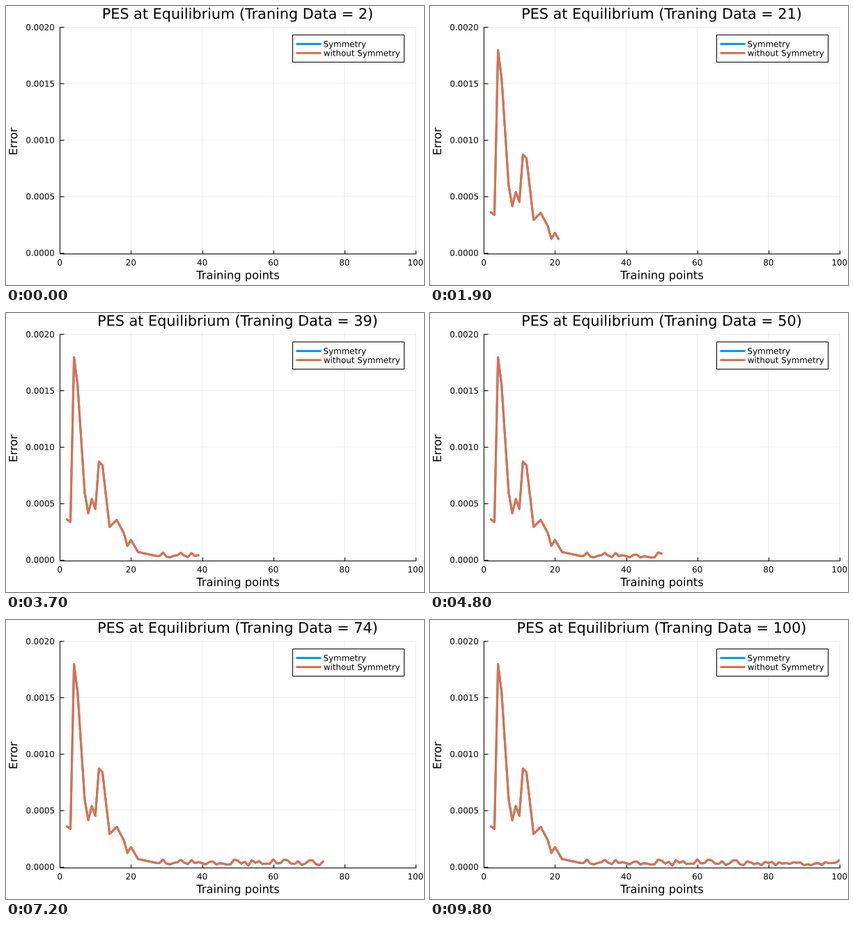
Write a matplotlib script that moves like this. It is 600 px wide and 400 px high and loops after 9.9 s.

```python
import numpy as np
import matplotlib.pyplot as plt
from matplotlib.animation import FuncAnimation
from matplotlib.patches import PathPatch, Rectangle
from matplotlib.textpath import TextPath
from matplotlib.transforms import Affine2D

W, H, DPI = 600, 400, 100
LEFT, RIGHT, TOP, BOTTOM = 77.2, 588, 30.3, 355.3
Y_MIN, Y_MAX = -1e-5, 0.002
BLUE, ORANGE = "#009afa", "#e36f47"
SMALL, MEDIUM, LARGE = 11.86, 16.3, 20.76
FIRST, LAST = 2, 100

plt.rcParams["font.family"] = "DejaVu Sans"


def error_curve(sizes):
    """Turning points of the early decay, then a small random floor."""
    turns = np.array([
        (2, 35.8), (3, 33.4), (4, 179.5), (5, 155), (7, 59.5), (8, 41.2),
        (9, 53.8), (10, 45), (11, 87), (12, 83.7), (14, 29), (16, 35.3),
        (18, 23.5), (19, 12.2), (20, 17.5), (22, 6.8), (27, 3.4),
    ])
    noise = np.random.default_rng(4).triangular(0.2, 2.5, 7.5, len(sizes))
    decay = np.interp(sizes, turns[:, 0], turns[:, 1])
    return 1e-5 * np.where(sizes > turns[-1, 0], noise, decay)


def pt(px):
    return px * 72 / DPI


def outline(text, size, anchor):
    """Glyph path whose ink is anchored at x = 0 (0 left, 0.5 centre, 1 right)."""
    path = TextPath((0, 0), text, size=size)
    box = path.get_extents()
    return Affine2D().translate(-box.x0 - anchor * box.width, 0).transform_path(path)


def label(x, y, text, size, anchor=0.5, angle=0):
    place = Affine2D().rotate_deg(angle).scale(1, -1).translate(x, y)
    patch = PathPatch(outline(text, size, anchor), fc="black", lw=0, snap=False,
                      transform=place + stage.transData, zorder=5)
    return stage.add_patch(patch)


def stroke(axes, xs, ys, color):
    return axes.plot(xs, ys, color=color, lw=pt(3), zorder=4,
                     solid_capstyle="round", solid_joinstyle="round")[0]


fig = plt.figure(figsize=(W / DPI, H / DPI), dpi=DPI, facecolor="white")

ax = fig.add_axes([LEFT / W, 1 - BOTTOM / H, (RIGHT - LEFT) / W, (BOTTOM - TOP) / H])
ax.set_xlim(0, 100)
ax.set_ylim(Y_MIN, Y_MAX)
x_ticks, y_ticks = np.linspace(0, 100, 6), np.linspace(0, Y_MAX, 5)
ax.set_xticks(x_ticks)
ax.set_yticks(y_ticks)
ax.tick_params(direction="in", length=pt(5.5), width=pt(1),
               labelbottom=False, labelleft=False)
ax.set_axisbelow(True)
ax.grid(color="black", alpha=0.1, lw=pt(0.74), snap=False, clip_on=False)
for side, spine in ax.spines.items():
    spine.set_visible(side in ("left", "bottom"))
    spine.set_linewidth(pt(1))

# Overlay in pixel coordinates for text and legend
stage = fig.add_axes([0, 0, 1, 1], zorder=5)
stage.set_xlim(0, W)
stage.set_ylim(H, 0)
stage.axis("off")

for v in x_ticks:
    label(LEFT + (RIGHT - LEFT) * v / 100, 371.9, f"{v:.0f}", SMALL)
for v in y_ticks:
    y = TOP + (BOTTOM - TOP) * (Y_MAX - v) / (Y_MAX - Y_MIN)
    label(69, y + 4.5, f"{v:.4f}", SMALL, anchor=1)

mid_x, mid_y = (LEFT + RIGHT) / 2, (TOP + BOTTOM) / 2
label(mid_x, 391.5, "Training points", MEDIUM)
label(16.1, mid_y + 0.6, "Error", MEDIUM, angle=90)
title = label(mid_x, 18.3, " ", LARGE) if False else label(mid_x, 18.3, "PES", LARGE)

stage.add_patch(Rectangle((411, 41), 160, 39, fc="white", ec="black", lw=pt(1)))
for y, color, name in ((54.2, BLUE, "Symmetry"), (67.2, ORANGE, "without Symmetry")):
    stroke(stage, [417, 450.5], [y, y], color)
    label(456.3, y + 4.5, name, SMALL, anchor=0)

sizes = np.arange(FIRST, LAST + 1)
errors = error_curve(sizes)
curves = [stroke(ax, [], [], color) for color in (BLUE, ORANGE)]


def draw(i):
    text = f"PES at Equilibrium (Traning Data = {FIRST + i})"
    title.set_path(outline(text, LARGE, 0.5))
    # A single point has no segment to show
    shown = i + 1 if i else 0
    for curve in curves:
        curve.set_data(sizes[:shown], errors[:shown])
    return [title, *curves]


anim = FuncAnimation(fig, draw, frames=len(sizes), interval=100,
                     repeat=True, repeat_delay=0, blit=False)
plt.show()
```
